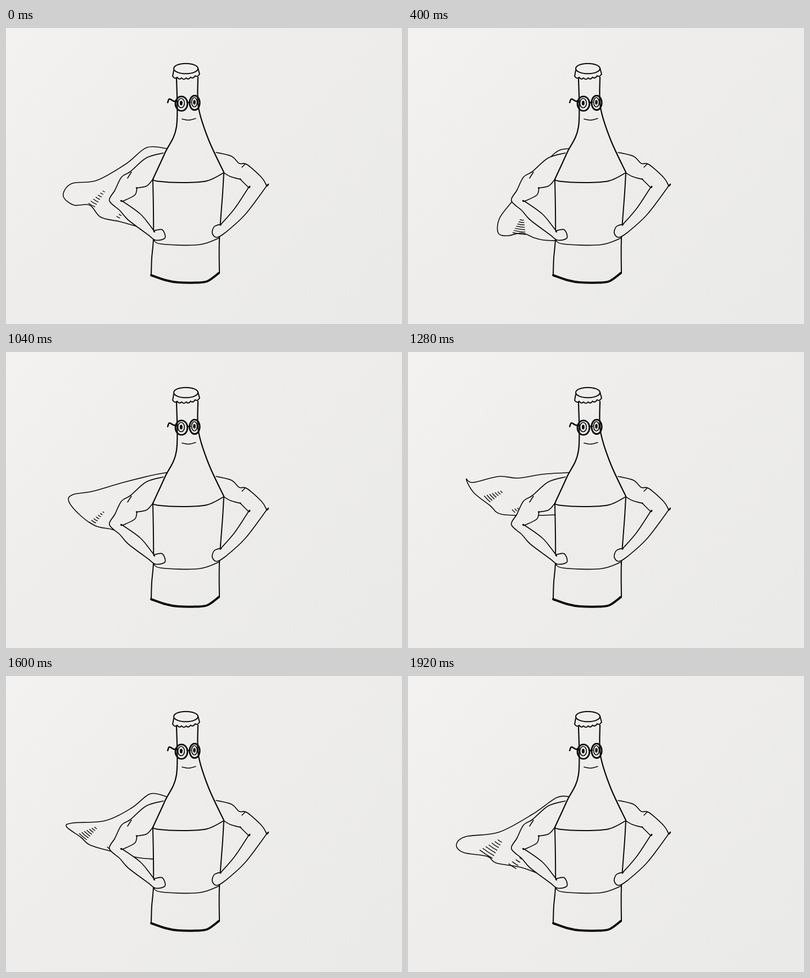
Write an HTML page that moves like this. It is 720x540 px and loops after 2000 ms.

```html
<!DOCTYPE html>
<html lang="en">
<head>
<meta charset="utf-8">
<title>Bottle hero</title>
<style>
  html, body { margin: 0; width: 100%; height: 100%; overflow: hidden; background: #eeedeb; }
  svg { display: block; width: 100%; height: 100%; }
  path, ellipse { fill: none; stroke: #080808; stroke-width: 1.6; stroke-linejoin: round; stroke-linecap: round; }
  #folds { stroke-width: 1.4; stroke-linecap: butt; }
  .solid { fill: url(#paper); }
</style>
</head>
<body>
<svg viewBox="0 0 720 540">
  <defs>
    <linearGradient id="paper" gradientUnits="userSpaceOnUse" x1="0" y1="0" x2="620" y2="560">
      <stop offset="0" stop-color="#f3f2f1"/>
      <stop offset=".45" stop-color="#eeedec"/>
      <stop offset="1" stop-color="#eaeae9"/>
    </linearGradient>
  </defs>
  <rect width="720" height="540" fill="url(#paper)"/>
  <path id="cape"/>
  <path id="folds"/>
  <g id="bottle"></g>
</svg>
<script>
const $ = id => document.getElementById(id);
const nums = text => text.trim().split(/[ ,]+/).map(Number);
const mix = (a, b, k) => a.map((v, i) => v + (b[i] - v) * k);

// Smooth curve through a flat list of points; a repeated point makes a corner.
function curve(p) {
  const last = p.length / 2 - 1;
  const at = i => {
    const j = 2 * Math.max(0, Math.min(last, i));
    return [p[j], p[j + 1]];
  };
  const pull = (from, a, b) => from.map((v, k) => v + (b[k] - a[k]) / 6);
  let d = 'M' + at(0);
  for (let i = 0; i < last; i++) {
    const c1 = pull(at(i), at(i - 1), at(i + 1));
    const c2 = pull(at(i + 1), at(i + 2), at(i));
    d += `C${c1} ${c2} ${at(i + 1)}`;
  }
  return d;
}

function add(tag, attrs, width, cls = '') {
  const el = document.createElementNS('http://www.w3.org/2000/svg', tag);
  for (const name in attrs) el.setAttribute(name, attrs[name]);
  el.setAttribute('class', cls);
  el.style.strokeWidth = width;
  $('bottle').append(el);
}
const ink = (points, width, cls) => add('path', { d: curve(nums(points)) }, width, cls);
const oval = (cx, cy, rx, ry, width, cls) => add('ellipse', { cx, cy, rx, ry }, width, cls);

// Glass, base and label
ink('267,276 268,330 268,385 265,420 264,450', 2);
ink('396,264 394,300 388,385 388,447', 2);
ink('264,451 290,460 312,464 345,464.5 366,462 387,447', 4);
ink('267,276 275,279.5 320,282 365,279 396,264', 1.9);
ink('268,386 282,394 350,395.5 388,383', 1.7);

// Arms, each from the shoulder round the fist to the armpit
ink(`286,228 255,237 226,262 210,272 198,296 188,315 207,333 222,350 258,377 272,387 289,383 284,368
  269,370 269,370 245,340 212,316 212,316 234,305 238,292 238,292 256,288 267,276`, 1.7, 'solid');
ink(`382,227 410,234 424,247 438,249 465,273 474,288 474,288 435,340 399,373 383,382 375,374 379,362
  391,358 391,358 416,329 441,291 441,291 426,276 426,276 408,271 396,264`, 1.7, 'solid');
ink('228,263 221,274', 1.6);
ink('435,248 429,254', 1.6);

// Neck over the shoulders
ink('310,90 310,180 289,228 267,276', 2.2);
ink('349,90 350,145 368,203 396,263', 2.2);

// Cap: a scalloped skirt under an oval lid
const SCALLOPS = 6;
const rim = u => [303 + 49 * u, 88 - 4 * u + 5 * Math.sin(Math.PI * u)];
let skirt = 'M305,77L' + rim(0);
for (let i = 0; i < SCALLOPS; i++) {
  const [x, y] = rim((i + 0.5) / SCALLOPS);
  skirt += `Q${x},${y + 5} ${rim((i + 1) / SCALLOPS)}`;
}
add('path', { d: skirt + 'L349,73' }, 2, 'solid');
oval(327, 74, 22, 9.3, 2, 'solid');

// Glasses and mouth
for (const [x, y, k] of [[319, 138, 1], [343, 136.5, 0.84]]) {
  oval(x, y, 11 * k, 13.2, 2.8);
  oval(x - 0.5, y - 1, 6 * k, 8.5, 1.7);
  oval(x - 0.5, y - 1, 1.3 * k, 3, 2.4);
}
ink('294,136 297,129.5 304,133 309,134', 2.6);
ink('330,136 335,135.5', 2.6);
ink('320,166 332,168 345,165', 1.5);

// Cape poses: first and last beat, edge from top to nose (fifth point) to hem,
// then the folds: foot x,y, rise dx,dy, width of the longest crease, size of the second set.
const SHOULDER = [292, 220];
const poses = [
  [0, 1, '256,218 218,248 165,278 119,284 104,306 123,323 152,323 172,345 206,353 238,362', '156,323 22,-25 14 .5'],
  [5, 5, '266,229 215,285 188,318 166,348 164,374 181,379 207,374 230,383 247,387 268,388', '202,375 5,-25 24 0'],
  [9, 9, '262,226 212,257 180,303 141,346 130,358 150,366 175,361 205,358 222,361 241,363', '186,356 1,-25 30 0'],
  [13, 14, '265,225 213,238 158,254 122,260 114,272 134,297 162,317 190,323 205,328 225,340', '156,313 21,-21 11 0'],
  [16, 16, '245,223 200,230 165,227 118,238 106,232 119,256 149,280 170,296 230,298 268,297', '144,268 26,-13 16 .5'],
  [20, 20, '262,215 228,241 180,264 122,268 110,275 136,294 152,308 188,319 238,331 268,334', '140,293 23,-16 18 .6'],
  [24, 24, '270,222 225,253 165,285 105,293 88,308 101,322 144,329 160,341 205,349 238,361', '142,325 25,-24 28 .6']
].map(([from, to, edge, folds]) => ({ from, to, edge: SHOULDER.concat(nums(edge)), folds: nums(folds) }));

// Creases shrink as they climb and turn with the lean of their set.
function hatch(x, y, dx, dy, width, count) {
  const turn = 0.72 * Math.atan2(dx, -dy);
  let d = '';
  for (let i = 0; i < count; i++) {
    const u = i / (count - 1);
    const half = width * (1 - 0.68 * u) / 2;
    const wx = half * Math.cos(turn), wy = half * Math.sin(turn);
    const cx = x + dx * u, cy = y + dy * u;
    d += `M${cx - wx},${cy - wy}Q${cx},${cy + 1} ${cx + wx},${cy + wy}`;
  }
  return d;
}

const LOOP = 2000, BEAT = 80, BEATS = LOOP / BEAT;

function draw(time) {
  const beat = Math.floor((time % LOOP) / BEAT);
  const i = poses.findLastIndex(p => p.from <= beat);
  const a = poses[i], b = poses[(i + 1) % poses.length];
  const end = b.from || BEATS;
  const k = Math.max(0, (beat - a.to) / (end - a.to));
  const [x, y, dx, dy, width, size] = mix(a.folds, b.folds, k);
  $('cape').setAttribute('d', curve(mix(a.edge, b.edge, k)));
  $('folds').setAttribute('d', hatch(x, y, dx, dy, width, 7) +
    hatch(x + 48, y + 22, dx * size, dy * size, width * size, size ? 4 : 0));
}

const start = performance.now();
function tick() {
  draw(performance.now() - start);
  requestAnimationFrame(tick);
}
tick();
</script>
</body>
</html>
```
